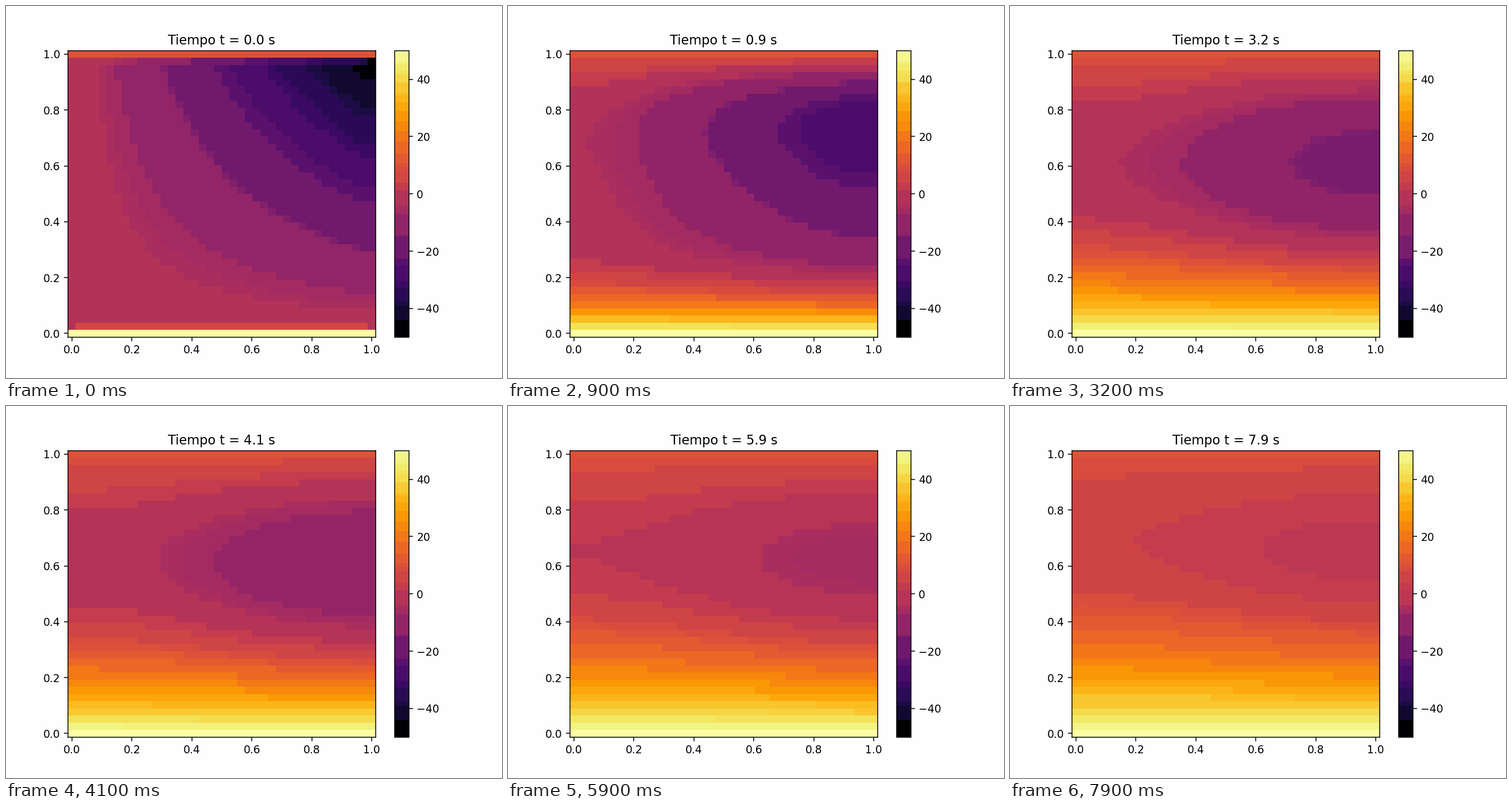
Write a matplotlib script that moves like this. It is 864x648 px and loops after 8 s.

```python
import numpy as np
import matplotlib.pyplot as plt
from matplotlib.animation import FuncAnimation
from matplotlib.colors import ListedColormap

N = 40
FRAMES, STEPS = 80, 10
DT, ALPHA = 0.01, 0.01
VMIN, VMAX = -50, 50
CELL_PX, BAR_PX, INK_PX = 167, 49, 4500

axis = np.linspace(0, 1, N)
X, Y = np.meshgrid(axis, axis)
R = ALPHA * DT * (N - 1) ** 2


def step(u):
    """One explicit heat step: fixed top and bottom, insulated sides."""
    u = u.copy()
    u[:, 0], u[:, -1] = u[:, 1], u[:, -2]
    u[0], u[-1] = 50, 10
    mid = u[1:-1, 1:-1]
    lap = u[2:, 1:-1] + u[:-2, 1:-1] + u[1:-1, 2:] + u[1:-1, :-2] - 4 * mid
    u[1:-1, 1:-1] = mid + R * lap
    return u


def solve():
    u = step(-50 * X * Y)
    fields = [u]
    for _ in range(FRAMES - 1):
        for _ in range(STEPS):
            u = step(u)
        fields.append(u)
    return fields


# Inferno reduced to coarse RGB buckets, each shown in its mean colour
base = np.rint(plt.get_cmap("inferno")(np.arange(256))[:, :3] * 255).astype(int)
keys = (base[:, 0] >> 5) * 128 + (base[:, 1] >> 4) * 8 + (base[:, 2] >> 5)
_, bucket = np.unique(keys, return_inverse=True)
bucket = bucket.ravel()


def banded(u):
    level = np.clip((u - VMIN) / (VMAX - VMIN) * 256, 0, 255).astype(int)
    weight = BAR_PX + CELL_PX * np.bincount(level.ravel(), minlength=256)
    total = np.bincount(bucket, weight)
    total[bucket[0]] += INK_PX  # black lines and text share the darkest band
    mean = [np.bincount(bucket, weight * base[:, c]) / total for c in range(3)]
    return ListedColormap(np.floor(np.array(mean).T)[bucket] / 255)


fields = solve()
fig, ax = plt.subplots(figsize=(6.4, 4.8), dpi=135, facecolor="#fefefe")
mesh = ax.pcolormesh(X, Y, fields[0], cmap=banded(fields[0]),
                     vmin=VMIN, vmax=VMAX, shading="nearest")
fig.colorbar(mesh, ax=ax)
title = ax.set_title("Tiempo t = 0.0 s")


def update(i):
    mesh.set_array(fields[i])
    mesh.set_cmap(banded(fields[i]))
    title.set_text(f"Tiempo t = {i * STEPS * DT:.1f} s")
    return mesh, title


anim = FuncAnimation(fig, update, frames=FRAMES, interval=100,
                     repeat=True, repeat_delay=0, blit=False)
plt.show()
```
